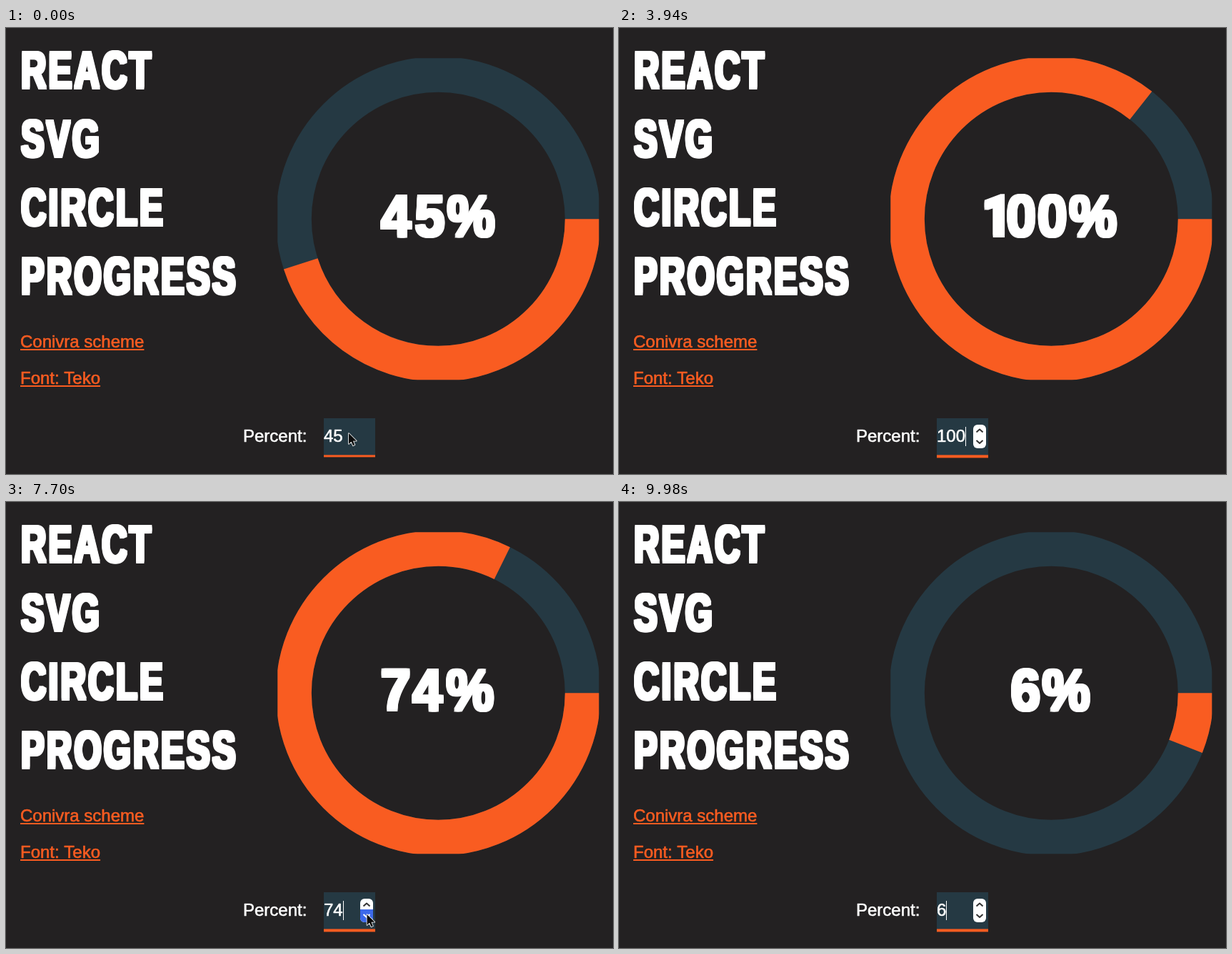
Animation of 850 by 624 pixels, one loop 10 s. Source, as an HTML page with a canvas:

```html
<!DOCTYPE html>
<html lang="en">
<head>
<meta charset="utf-8">
<title>React SVG circle progress</title>
<style>
  html, body { margin: 0; width: 100%; height: 100%; overflow: hidden; background: #232122; }
  canvas { display: block; }
</style>
</head>
<body>
<canvas id="stage" width="850" height="624"></canvas>
<script>
const ctx = document.getElementById("stage").getContext("2d");
const LOOP = 10000;
const EASE_MS = 600;
const BG = "#232122", TEAL = "#253943", ORANGE = "#f95c21", WHITE = "#fff";
const SANS = '"Liberation Sans", Arial, sans-serif';
const PLAIN = "24px " + SANS;
const SPREAD = 2.1; // sideways thickening of the heavy lettering

// Moments of the interaction, in ms
const FOCUS = 2300, SELECT = 2450, TYPE = 3445, BACK = 4400;
const PRESS = 5500, RELEASE = 8400, ERASE = 9330;

// Every value the field takes: typing, a held spin button, one backspace
const events = [[-EASE_MS, 45], [TYPE, 1], [TYPE + 100, 10], [TYPE + 200, 100], [PRESS, 99]];
for (let k = 0; k <= 34; k++) events.push([6080 + k * 67.5, 98 - k]);
events.push([ERASE, 6]);

const mix = (a, b, u) => a + (b - a) * u;
const clamp = u => Math.min(1, Math.max(0, u));

// CSS "ease": cubic-bezier(.25, .1, .25, 1)
function ease(x) {
  if (x <= 0) return 0;
  if (x >= 1) return 1;
  const curve = (a, b, s) => 3 * a * s * (1 - s) ** 2 + 3 * b * s * s * (1 - s) + s ** 3;
  let lo = 0, hi = 1;
  for (let i = 0; i < 24; i++) {
    const mid = (lo + hi) / 2;
    if (curve(0.25, 0.25, mid) < x) lo = mid; else hi = mid;
  }
  return curve(0.1, 1, lo);
}

// Each change restarts the transition from wherever the ring is
const steps = [];
for (const [at, to] of events) {
  const last = steps[steps.length - 1];
  steps.push({ at, to, from: last ? ringAt(last, at) : to });
}

function ringAt(step, t) {
  return mix(step.from, step.to, ease((t - step.at) / EASE_MS));
}

function stepAt(t) {
  let i = steps.length - 1;
  while (steps[i].at > t) i--;
  return steps[i];
}

function rect(x, y, w, h, color) {
  ctx.fillStyle = color;
  ctx.fillRect(x, y, w, h);
}

// Plain text with the slightly fuller weight of desktop smoothing
function text(str, x, y, color) {
  ctx.font = PLAIN;
  ctx.fillStyle = ctx.strokeStyle = color;
  ctx.lineWidth = 0.6;
  ctx.lineJoin = "round";
  ctx.fillText(str, x, y);
  ctx.strokeText(str, x, y);
}

function link(str, y) {
  text(str, 20, y, ORANGE);
  rect(20, y + 2, ctx.measureText(str).width, 2, ORANGE);
}

// Condensed, extra heavy lettering
function heavy(str, x, y, ratio) {
  ctx.fillStyle = WHITE;
  for (const dx of [-SPREAD, 0, SPREAD]) {
    for (const dy of [-2, 0, 2]) {
      ctx.save();
      ctx.translate(x + dx, y + dy);
      ctx.scale(ratio, 1);
      ctx.fillText(str, 0, 0);
      ctx.restore();
    }
  }
}

function title() {
  ctx.save();
  ctx.font = "bold 72.5px " + SANS;
  ctx.fontKerning = "none";
  ctx.letterSpacing = "4.9px";
  ["REACT", "SVG", "CIRCLE", "PROGRESS"].forEach((word, i) => heavy(word, 21, 84 + i * 96, 0.675));
  ctx.restore();
}

function percentLabel(value) {
  const ratio = 0.92, gap = 2.5;
  const glyphs = [...value + "%"].map(ch => {
    const font = ch === "1" ? "900 80px Roboto, sans-serif" : "bold 82px " + SANS;
    ctx.font = font;
    const m = ctx.measureText(ch);
    const left = m.actualBoundingBoxLeft * ratio;
    return { ch, font, left, width: left + m.actualBoundingBoxRight * ratio + 2 * SPREAD };
  });
  const total = glyphs.reduce((sum, g) => sum + g.width + gap, -gap);
  let x = 604.5 - total / 2;
  for (const g of glyphs) {
    ctx.font = g.font;
    heavy(g.ch, x + SPREAD + g.left, 291, ratio);
    x += g.width + gap;
  }
}

function ring(percent) {
  const arc = (share, color) => {
    ctx.beginPath();
    ctx.arc(225, 225, 202.5, 0, share * Math.PI * 2);
    ctx.strokeStyle = color;
    ctx.stroke();
  };
  ctx.save();
  ctx.translate(380.3, 42.3);
  ctx.beginPath();
  ctx.rect(0, 0, 450, 450);
  ctx.clip();
  ctx.lineWidth = 50;
  arc(1, TEAL);
  arc(percent / 100, ORANGE);
  ctx.restore();
}

function chevron(y, dir, color) {
  ctx.beginPath();
  ctx.moveTo(500.5, y + 2 * dir);
  ctx.lineTo(505, y - 2 * dir);
  ctx.lineTo(509.5, y + 2 * dir);
  ctx.lineWidth = 2;
  ctx.strokeStyle = color;
  ctx.stroke();
}

function spinner(pressed) {
  ctx.save();
  ctx.beginPath();
  ctx.roundRect(496, 555, 18, 33, 6);
  ctx.clip();
  rect(496, 555, 18, 33, WHITE);
  if (pressed) rect(496, 570, 18, 18, "#3d69ea");
  ctx.restore();
  chevron(563.5, 1, "#333");
  chevron(579, -1, pressed ? WHITE : "#333");
}

function field(t, step) {
  const focused = t >= FOCUS;
  const value = String(step.to);
  rect(445, 546, 72, 52, TEAL);
  rect(445, 597.4, 72, focused ? 4 : 3, ORANGE);
  ctx.font = PLAIN;
  const width = ctx.measureText(value).width;
  if (t >= SELECT && t < TYPE) rect(445, 558, width, 27, "#5f82b4");
  text(value, 445, 579, WHITE);
  if (!focused) return;
  if (t >= TYPE && (t - step.at) % 1000 < 670) rect(Math.round(445 + width), 558, 1, 27, WHITE);
  spinner(t >= PRESS && t < RELEASE);
}

function arrow(x, y) {
  const points = [[0, 0], [0, 15], [3.5, 11.8], [6, 17.3], [8.4, 16.2], [6, 10.8], [10.8, 10.8]];
  ctx.beginPath();
  points.forEach(([px, py]) => ctx.lineTo(x + px, y + py));
  ctx.closePath();
  ctx.lineJoin = "round";
  ctx.lineWidth = 1.6;
  ctx.strokeStyle = WHITE;
  ctx.stroke();
  ctx.fillStyle = "#0c0c0c";
  ctx.fill();
}

function beam(x, y) {
  ctx.beginPath();
  for (const side of [-3, 3]) {
    ctx.moveTo(x + side, y - 8.5);
    ctx.quadraticCurveTo(x, y - 8.5, x, y - 6);
    ctx.lineTo(x, y + 6);
    ctx.quadraticCurveTo(x, y + 8.5, x + side, y + 8.5);
  }
  ctx.lineWidth = 1;
  ctx.strokeStyle = "#2b2b2b";
  ctx.stroke();
}

function pointer(t) {
  if (t < 1000) {
    const u = ease(t / 1000);
    arrow(mix(480, 474, u), mix(567, 565, u));
  } else if (t < TYPE) {
    beam(474.5, 570.5);
  } else if (t >= BACK && t < ERASE) {
    const u = ease((t - BACK) / 800);
    const x = mix(474.5, 504, u) + 2 * clamp((t - PRESS) / 2900);
    const y = mix(570.5, 576, u) + clamp((t - PRESS) / 1400);
    if (x < 494) beam(x, y); else arrow(x, y);
  }
}

const start = performance.now();

function draw() {
  const t = Math.max(0, performance.now() - start) % LOOP;
  const step = stepAt(t);
  rect(0, 0, 850, 624, BG);
  title();
  link("Conivra scheme", 447);
  link("Font: Teko", 498);
  ring(ringAt(step, t));
  percentLabel(step.to);
  text("Percent:", 332, 579, WHITE);
  field(t, step);
  pointer(t);
  requestAnimationFrame(draw);
}

draw();
</script>
</body>
</html>
```
